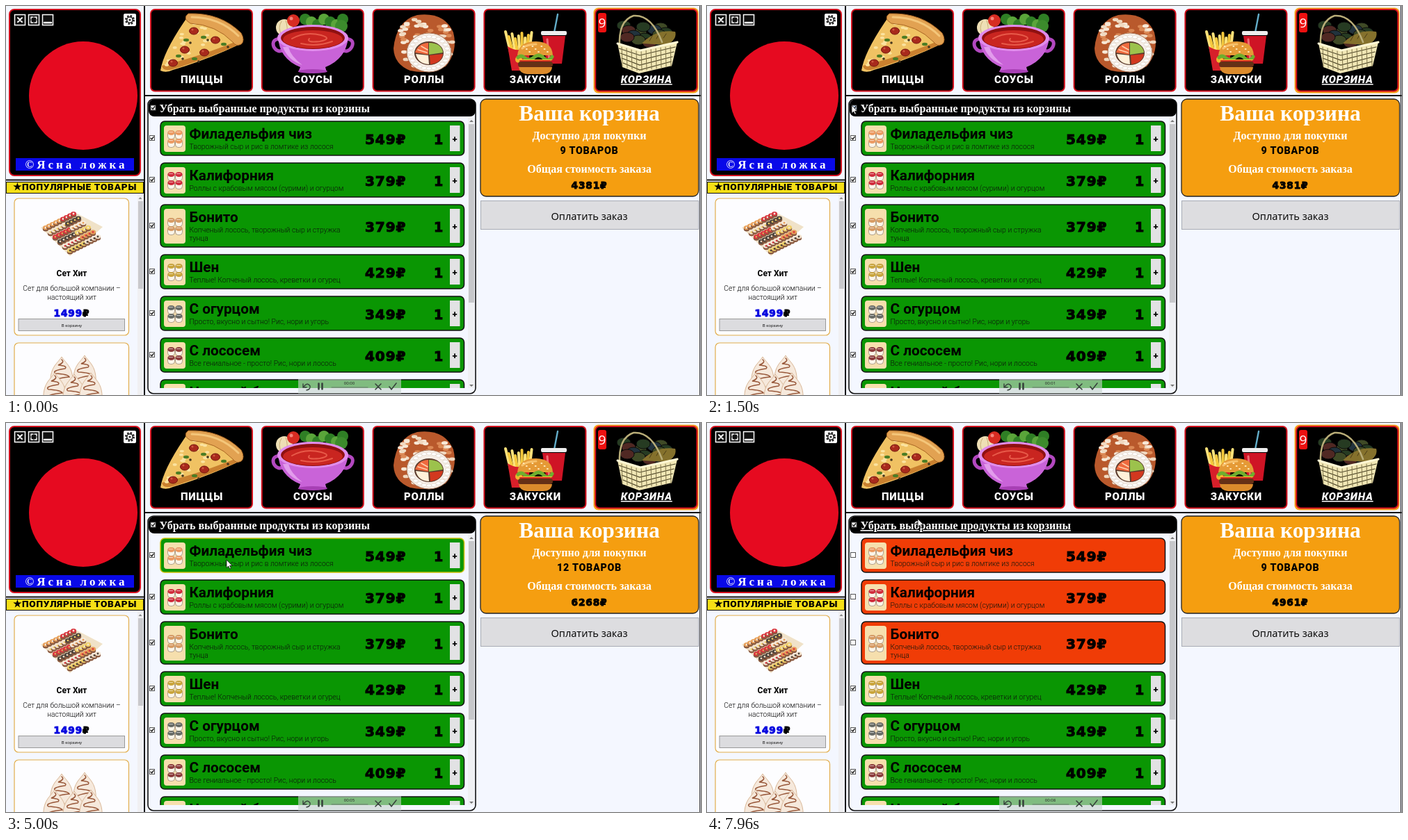
Animation of 999x560 px, one loop 8000 ms. Source, as an HTML page:

```html
<!DOCTYPE html>
<html lang="ru">
<head>
<meta charset="utf-8">
<title>Корзина</title>
<style>
html, body { margin: 0; width: 100%; height: 100%; overflow: hidden; background: #f4f7ff; }
svg { display: block; }
text { white-space: pre; }
.bold { font-family: Roboto, sans-serif; font-weight: 700; }
.heavy { font-family: Roboto, sans-serif; font-weight: 900; letter-spacing: .8px; }
.thin { font-family: Roboto, sans-serif; font-weight: 300; }
.ui { font-family: "Open Sans", sans-serif; }
.old { font-family: "Liberation Serif", serif; font-weight: 700; }
.price { font-family: "DejaVu Sans", sans-serif; font-weight: 700; stroke: currentColor; stroke-width: 1; letter-spacing: .9px; }
</style>
</head>
<body>
<svg id="stage" width="999" height="560" viewBox="0 0 999 560"></svg>
<script>
const LOOP = 8000;
const PAGE = '#f4f7ff', GREEN = '#0a9603', RED = '#f03c06', GOLD = '#c9bd05';

// y, height, title, description lines, price, topping colour, time it is unticked
const rows = [
  [166, 49, 'Филадельфия чиз', ['Творожный сыр и рис в ломтике из лосося'], 549, '#ec9a62', 5340],
  [226, 49, 'Калифорния', ['Роллы с крабовым мясом (сурими) и огурцом'], 379, '#d02c3c', 6090],
  [286, 61, 'Бонито', ['Копченый лосось, творожный сыр и стружка', 'тунца'], 379, '#d79b63', 6630],
  [358, 49, 'Шен', ['Теплые! Копченый лосось, креветки и огурец'], 429, '#c9a43a', LOOP],
  [418, 49, 'С огурцом', ['Просто, вкусно и сытно! Рис, нори и угорь'], 349, '#676b66', LOOP],
  [478, 49, 'С лососем', ['Все гениальное - просто! Рис, нори и лосось'], 409, '#8c3b3b', LOOP],
  [538, 49, 'Нежный бонито', [''], 389, '#d79b63', LOOP]
];

// time, item count, sum
const totals = [[0, 9, 4381], [1960, 0, 0], [2250, 12, 6268], [5340, 11, 5719], [6090, 10, 5340], [6630, 9, 4961]];

// time, x, y of the pointer tip
const path = [
  [40, 470, 566], [830, 219, 254], [880, 219, 254], [1450, 208, 143], [3000, 208, 143],
  [3570, 317, 197], [5340, 317, 197], [5620, 318, 226], [5700, 318, 226], [6040, 318, 242],
  [6130, 318, 242], [6410, 318, 306], [7520, 318, 306], [7950, 303, 138]
];

const tag = (name, attrs, body = '') =>
  `<${name} ${Object.entries(attrs).map(([k, v]) => `${k}="${v}"`).join(' ')}>${body}</${name}>`;
const box = (x, y, width, height, fill, more = {}) => tag('rect', { x, y, width, height, fill, ...more });
const oval = (cx, cy, rx, ry, fill, more = {}) => tag('ellipse', { cx, cy, rx, ry, fill, ...more });
const dot = (x, y, r, fill, more) => oval(x, y, r, r, fill, more);
const shape = (d, fill, more = {}) => tag('path', { d, fill, ...more });
const line = (d, stroke, width = 1) => shape(d, 'none', { stroke, 'stroke-width': width, 'stroke-linecap': 'round' });
const text = (x, y, body, cls, size, more = {}) => tag('text', { x, y, class: cls, 'font-size': size, ...more }, body);
const mid = { 'text-anchor': 'middle' };
const white = { fill: '#fff' };
const times = (n, make) => Array.from({ length: n }, (_, i) => make(i)).join('');

function seeded(seed) {
  return () => (seed = (seed * 16807) % 2147483647) / 2147483647;
}

function tick(x, y, id) {
  return tag('g', { id }, box(x, y, 7, 7, '#fff', { stroke: '#555', 'stroke-width': 1 }) +
    shape(`M${x + 1.3} ${y + 3.4}l1.8 2 2.8-4`, 'none', { class: 'mark', stroke: '#111', 'stroke-width': 1.4 }));
}

function pizza() {
  const peps = [[270, 36], [301, 49], [257, 63], [285, 67], [240, 82]];
  const bits = seeded(11);
  return shape('M260 17Q226 66 222 93Q230 97 240 92Q290 77 334 56L318 34Z', '#f0c263') +
    shape('M224 86Q226 96 243 90Q292 75 336 55L331 51Q280 72 224 86Z', '#c9802f') +
    times(28, () => { const v = bits(), u = bits() - .5; return oval(289 - 58 * v + 58 * u * (1 - v), 34 + 51 * v + 30 * u * (1 - v), 3, 1.8, '#fbe3a0'); }) +
    peps.map(([x, y]) => oval(x, y, 6.5, 5, '#a82a1c', { stroke: '#74180f' }) + dot(x - 2, y - 2, 1.5, '#cf5940')).join('') +
    [[284, 45], [259, 49], [313, 55], [271, 76], [248, 72]].map(([x, y]) => oval(x, y, 4, 2.2, '#4c7d25') + dot(x + 6, y + 4, 1.8, '#42351d')).join('') +
    shape('M262 11Q308 9 338 39Q344 50 338 55Q331 59 326 52Q302 27 265 25Q253 18 262 11Z', '#e2a252', { stroke: '#a86422' }) +
    line('M267 16Q307 16 334 43', '#f4c67a', 3);
}

function sauce() {
  return times(7, i => dot(430 + i * 9, 19 + (i % 3) * 4, 8, ['#2f7f25', '#5aa53a'][i % 2])) +
    oval(400, 31, 12, 12, '#eedfb5') + line('M396 22Q390 32 396 41M402 21Q406 31 403 42', '#c8ae75') +
    dot(413, 21, 9, '#d72c22') + dot(410, 18, 2.5, '#f4837a') + dot(482, 29, 9, '#3c8b2c') +
    line('M394 47Q381 48 385 59Q391 69 400 62M488 47Q502 48 497 59Q491 69 482 62', '#b348c0', 5) +
    shape('M391 45Q393 76 423 88L420 95H461L459 88Q489 76 492 45Z', '#c963d8') +
    shape('M398 59Q405 78 426 85Q409 72 406 59Z', '#e29cec') +
    oval(441, 46, 51, 19, '#e18dec') + oval(441, 46, 46, 16, '#8f1011') + oval(441, 48, 43, 13, '#c92520') +
    line('M411 47Q430 36 453 42Q470 47 451 51Q431 53 436 47M424 54Q447 59 469 51', '#e85a49', 2) +
    oval(441, 94, 21, 3, '#a840b5');
}

function roll() {
  const r = seeded(7);
  return shape('M557 61Q561 21 591 13Q630 8 643 38Q650 66 632 87Q608 99 581 93Q558 84 557 61Z', '#b9592c') +
    times(80, () => {
      const a = r() * 6.28, d = Math.sqrt(r());
      return oval(602 + 41 * d * Math.cos(a), 52 + 37 * d * Math.sin(a), 4.2, 2.4, ['#f0d9c0', '#dc8a56', '#f7e8d6'][Math.floor(r() * 3)]);
    }) +
    oval(608, 67, 32, 28, '#f6eee6', { stroke: '#a9765a', 'stroke-width': 1 }) +
    times(24, i => oval(608 + 27 * Math.cos(i * .262), 67 + 23 * Math.sin(i * .262), 3.6, 2.2, '#fff', { stroke: '#d8ccbc', 'stroke-width': .6 })) +
    oval(608, 68, 21, 17, '#5a3b2c') +
    shape('M588 67Q593 53 607 53L607 70Z', '#ef6a3e') + shape('M608 53Q626 53 628 67L608 70Z', '#9cc24c') +
    shape('M589 69L607 71L608 84Q592 83 589 69Z', '#fff1d9') + shape('M609 71L628 69Q626 82 610 84Z', '#d2381f') +
    line('M592 63L605 67M597 58L606 63', '#ffd0ad', 1.5);
}

function snacks() {
  const fries = times(9, i => line(`M${725 + i * 3.4} 66L${718 + i * 4.7} ${37 + (i * 7) % 11}`, i % 2 ? '#f5c83c' : '#ffe27a', 4));
  return fries + shape('M721 58Q737 69 754 57L750 93H727Z', '#d71f2a') + dot(737, 77, 5, '#f0b52e') +
    line('M788 38L793 12', '#63aeca', 2.4) + shape('M771 43H804L799 83H777Z', '#cf1425') +
    box(769, 36, 37, 6, '#eee', { rx: 2 }) + line('M778 48L781 80', '#ef6c73', 3) +
    shape('M735 71Q737 51 761 51Q785 51 786 71Z', '#e59a36') + line('M742 61Q749 55 762 55', '#f8c26c', 3) +
    times(9, i => oval(744 + i * 4.3, 58 + (i % 3) * 4, 1.5, .9, '#ffecbd')) +
    line('M736 74Q740 70 746 75T759 74T773 75T785 73', '#6fae2e', 5) +
    shape('M736 77H786L773 83L763 78L752 84Z', '#ffc72f') + box(736, 80, 50, 8, '#653016', { rx: 4 }) +
    line('M739 79H782', '#cf2a20', 2) + shape('M737 88H785Q784 98 772 98H749Q738 97 737 88Z', '#db8b2c');
}

function basket() {
  const cream = '#f1e7b5';
  return times(14, i => oval(888 + (i * 23) % 62, 28 + (i * 11) % 26, 10, 7, ['#263b22', '#3f4a26', '#22333d', '#502823'][i % 4], { stroke: '#0b0b0b' })) +
    shape('M914 54Q934 33 962 37Q965 48 950 56Z', '#85712c') + line('M925 50l4-7m6 4l4-7m6 6l4-6', '#4b3d17') +
    line('M882 59Q880 21 902 14Q928 12 943 52', '#b9ad78', 2.5) +
    shape('M879 54L912 64L965 52L957 86L910 97L886 88Z', cream) +
    times(4, i => line(`M${881 + i * 2} ${61 + i * 7}L911 ${71 + i * 7}L${962 - i * 2} ${59 + i * 7}`, '#4b4428', 1.2)) +
    times(11, i => line(`M${885 + i * 7} ${i < 4 ? 59 + i * 2 : 68 - i}l1 ${i < 4 ? 28 : 29}`, '#80754b', 1)) +
    line('M879 54L912 64L965 52', '#fff7d4', 3);
}

function categories() {
  const names = ['ПИЦЦЫ', 'СОУСЫ', 'РОЛЛЫ', 'ЗАКУСКИ', 'КОРЗИНА'];
  const art = [pizza, sauce, roll, snacks, basket];
  return box(844.5, 2.5, 151, 123, '#f7a21b', { rx: 7 }) + names.map((name, i) => {
    const x = 208 + i * 159.8;
    const more = i === 4 ? { 'font-style': 'italic', 'text-decoration': 'underline' } : {};
    return box(x, 5, 146, 117.5, '#000', { rx: 6, stroke: '#d2101d', 'stroke-width': 2 }) + art[i]() +
      text(x + 73.5, 111, name, 'heavy', 15, { ...mid, ...white, ...more });
  }).join('') + box(851, 10, 12, 28, '#ed1010', { rx: 3 }) + text(857, 31, '9', 'ui', 19, { ...mid, ...white });
}

function brandCard() {
  const icons = times(3, i => box(12.5 + i * 20, 12.5, 15, 15, '#111', { stroke: '#fff', 'stroke-width': 1.5 }));
  return box(5, 5, 188, 239, '#000', { rx: 7, stroke: '#d2101d', 'stroke-width': 2 }) + icons +
    line('M17 17l6 6m0-6l-6 6', '#fff', 2) + line('M36 19v-3h3m2 0h3v3m0 2v3h-3m-2 0h-3v-3', '#fff', 1.4) + line('M55 24h10', '#fff', 2.5) +
    box(169, 11, 18, 18, '#fff', { rx: 2 }) +
    dot(178, 20, 5.5, 'none', { stroke: '#222', 'stroke-width': 3, 'stroke-dasharray': '2.3 2' }) +
    dot(178, 20, 4.2, '#fff', { stroke: '#222', 'stroke-width': 1.5 }) + dot(178, 20, 1.6, '#222') +
    dot(111, 129, 78, '#e60a20') + box(14, 219, 170, 18, '#0909e8') +
    text(101, 234, '©Ясна ложка', 'old', 17, { ...mid, ...white, 'letter-spacing': 4 });
}

function platter() {
  const hues = ['#e9a05a', '#f3e3cf', '#d9343e', '#4a423a', '#f6eadb', '#f1d16a'];
  return shape('M50 319L97 296L139 318L92 360Z', '#f0e2c8') + times(54, i => {
    const a = i % 9, b = Math.floor(i / 9), x = 57 + a * 5 + b * 7, y = 319 - a * 2.5 + b * 6.6;
    return oval(x, y + 2, 4.2, 3.6, '#8a5a40') + oval(x, y, 4, 3.1, hues[(b + (a > 4 ? 2 : 0)) % 6]) + dot(x, y, 1.4, hues[(b + 4) % 6]);
  });
}

function dessert() {
  return [[80, 520], [113, 518], [70, 543], [98, 545], [122, 543]].map(([x, y]) =>
    shape(`M${x - 16} ${y + 28}C${x - 18} ${y} ${x - 7} ${y - 4} ${x} ${y - 15}C${x + 7} ${y - 4} ${x + 18} ${y} ${x + 16} ${y + 28}Z`, '#f6e9dc', { stroke: '#d9b797' }) +
    line(`M${x} ${y - 11}q5 4-5 8q14 1 10 5q-20 3-14 7q18 1 20 5q-22 2-24 8`, '#98583a', 1.5)).join('');
}

function popular() {
  const frame = { rx: 6, stroke: '#e2ad4b', 'stroke-width': 1.2 };
  return box(.5, 253.5, 197, 16, '#f6df16', { stroke: '#111' }) + text(99, 265, '★ПОПУЛЯРНЫЕ ТОВАРЫ', 'heavy', 13.6, mid) +
    box(12, 277, 164.5, 197, '#fdfdff', frame) + platter() +
    text(94.5, 389, 'Сет Хит', 'bold', 12, mid) +
    text(94.5, 410, 'Сет для большой компании –', 'thin', 10.3, mid) + text(94.5, 423, 'настоящий хит', 'thin', 10.3, mid) +
    text(94.5, 447, '<tspan fill="#0808df" color="#0808df">1499</tspan>₽', 'price', 13.6, mid) +
    box(18, 450.5, 152.5, 17, '#dcdcdf', { stroke: '#999' }) + text(94.5, 462, 'В корзину', 'ui', 6, mid) +
    box(12, 485, 164.5, 90, '#fdfdff', frame) + dessert() +
    box(189, 271, 8, 289, '#f0f0f2') + box(190, 281, 7, 126, '#c9c9cc') + shape('M190.5 278l2.5-3 2.5 3Z', '#888');
}

function thumb(y, h, hue) {
  const c = y + h / 2;
  return box(227, y + 6, 31, h - 11, '#f6dfad', { rx: 4 }) +
    times(4, i => {
      const x = 237.5 + (i % 2) * 11, d = c - 6 + (i > 1) * 12;
      return box(x - 5, d - 5, 10, 12, '#fbf5e8', { rx: 4, stroke: '#8f7d6a', 'stroke-width': .7 }) +
        oval(x, d - 2, 5, 3.6, hue) + line(`M${x - 3} ${d - 3}h5`, '#fff', .6);
    });
}

function row([y, h, title, lines, price, hue], i) {
  const c = y + h / 2;
  return box(222, y, 436.5, h, GREEN, { id: 'row' + i, rx: 6, 'stroke-width': 1.5 }) + thumb(y, h, hue) +
    text(263.5, y + 25, title, 'bold', 20.7) +
    lines.map((s, k) => text(263.5, y + 40 + k * 12, s, 'thin', 10.4, { fill: '#0c160c' })).join('') +
    text(516, c + 8, price + '₽', 'price', 20) +
    tag('g', { id: 'more' + i }, text(622, c + 8, '1', 'price', 19, mid) +
      box(638, y + 6, 14.5, h - 12, '#e2e2e4') + text(645, c + 5, '+', 'bold', 13, mid)) +
    tick(206.5, c - 4, 'tick' + i);
}

function cart() {
  return box(204, 134, 471, 424, PAGE, { rx: 8, stroke: '#111', 'stroke-width': 1.6 }) +
    box(205, 134.5, 470, 24.5, '#000', { rx: 8 }) + tick(208, 143, 'tickAll') +
    text(220.5, 153, 'Убрать выбранные продукты из корзины', 'old', 16, { ...white, id: 'clear' }) +
    tag('g', { 'clip-path': 'url(#list)' }, rows.map(row).join('')) +
    box(664, 161, 9.5, 389, '#eff0f3') + box(665, 170, 8, 257, '#c6c7ca') +
    shape('M666 167l3-3 3 3ZM666 545l3 3 3-3Z', '#777');
}

function summary() {
  const at = (y, body, cls, size, more) => text(838.5, y, body, cls, size, { ...mid, ...more });
  return box(682, 134, 313.5, 140, '#f59e10', { rx: 8, stroke: '#222', 'stroke-width': 1.3 }) +
    at(165, 'Ваша корзина', 'old', 31.4, white) + at(192, 'Доступно для покупки', 'old', 16, white) +
    at(213, '', 'heavy', 14.2, { id: 'count' }) + at(240, 'Общая стоимость заказа', 'old', 16, white) +
    at(263, '', 'price', 13.6, { id: 'sum' }) +
    box(682.5, 280.5, 313, 41, '#dddde0', { stroke: '#a9acb4' }) + at(308, 'Оплатить заказ', 'ui', 14.6);
}

function recorder() {
  const ink = '#37423c';
  return box(420, 537, 148, 21, '#c9d3ce', { opacity: .62 }) +
    line('M427 544v5h5M428 548Q433 541 437 547Q438 552 432 553', ink, 1.4) + line('M449.5 543.5v8M454.5 543.5v8', ink, 2.6) +
    line('M468 549H520', '#68776f', 1) + text(493.5, 544.5, '', 'ui', 6, { ...mid, id: 'clock', fill: '#222' }) +
    line('M531 544l8 8m0-8l-8 8M551 548l3 4 7-9', ink, 1.6);
}

const stage = document.getElementById('stage');
stage.innerHTML = '<defs><clipPath id="list"><rect x="204" y="160" width="460" height="390"/></clipPath></defs>' +
  box(0, 0, 999, 560, PAGE) + brandCard() + popular() + categories() + cart() + summary() + recorder() +
  line('M199 0V560M0 250.5H199M200 129H998', '#111', 2) + line('M997.5 0V560', '#222', 1.2) +
  shape('M0 0V11.5L2.7 9L4.6 13L6.4 12.2L4.6 8.3H8Z', '#fff', { id: 'pointer', stroke: '#111', 'stroke-width': .8 });

const get = id => document.getElementById(id);
const parts = rows.map((_, i) => ({ card: get('row' + i), more: get('more' + i), mark: get('tick' + i).querySelector('.mark') }));
const show = (node, on) => node.setAttribute('visibility', on ? 'visible' : 'hidden');

function pointerAt(t) {
  const next = path.findIndex(p => p[0] > t);
  if (next === 0) return path[0].slice(1);
  if (next < 0) return path[path.length - 1].slice(1);
  const [t0, x0, y0] = path[next - 1], [t1, x1, y1] = path[next];
  const u = (t - t0) / (t1 - t0), k = u * u * (3 - 2 * u);
  return [x0 + (x1 - x0) * k, y0 + (y1 - y0) * k];
}

function draw(t) {
  const [x, y] = pointerAt(t);
  const cleared = t >= 1960 && t < 2250;
  get('pointer').setAttribute('transform', `translate(${x} ${y})`);

  rows.forEach(([top, h, , , , , off], i) => {
    const on = !cleared && t < off, { card, more, mark } = parts[i];
    const hover = x >= 218 && x <= 658 && y >= top && y <= top + h && y < 550;
    card.setAttribute('fill', on ? GREEN : RED);
    card.setAttribute('stroke', hover ? GOLD : '#111');
    show(more, on);
    show(mark, on);
  });

  const all = get('tickAll');
  show(all.querySelector('.mark'), !cleared);
  all.querySelector('rect').setAttribute('fill', x < 216 && y < 151 ? '#cfe5ff' : '#fff');
  get('clear').setAttribute('text-decoration', x > 219 && x < 522 && y > 134 && y < 159 ? 'underline' : 'none');

  const [, count, sum] = totals.filter(s => s[0] <= t).pop();
  get('count').textContent = count + ' ТОВАРОВ';
  get('sum').textContent = sum + '₽';
  get('clock').textContent = '00:0' + Math.floor((t + 460) / 1000);
}

const start = performance.now();
function frame() {
  draw((performance.now() - start) % LOOP);
  requestAnimationFrame(frame);
}
draw(0);
requestAnimationFrame(frame);
</script>
</body>
</html>
```
